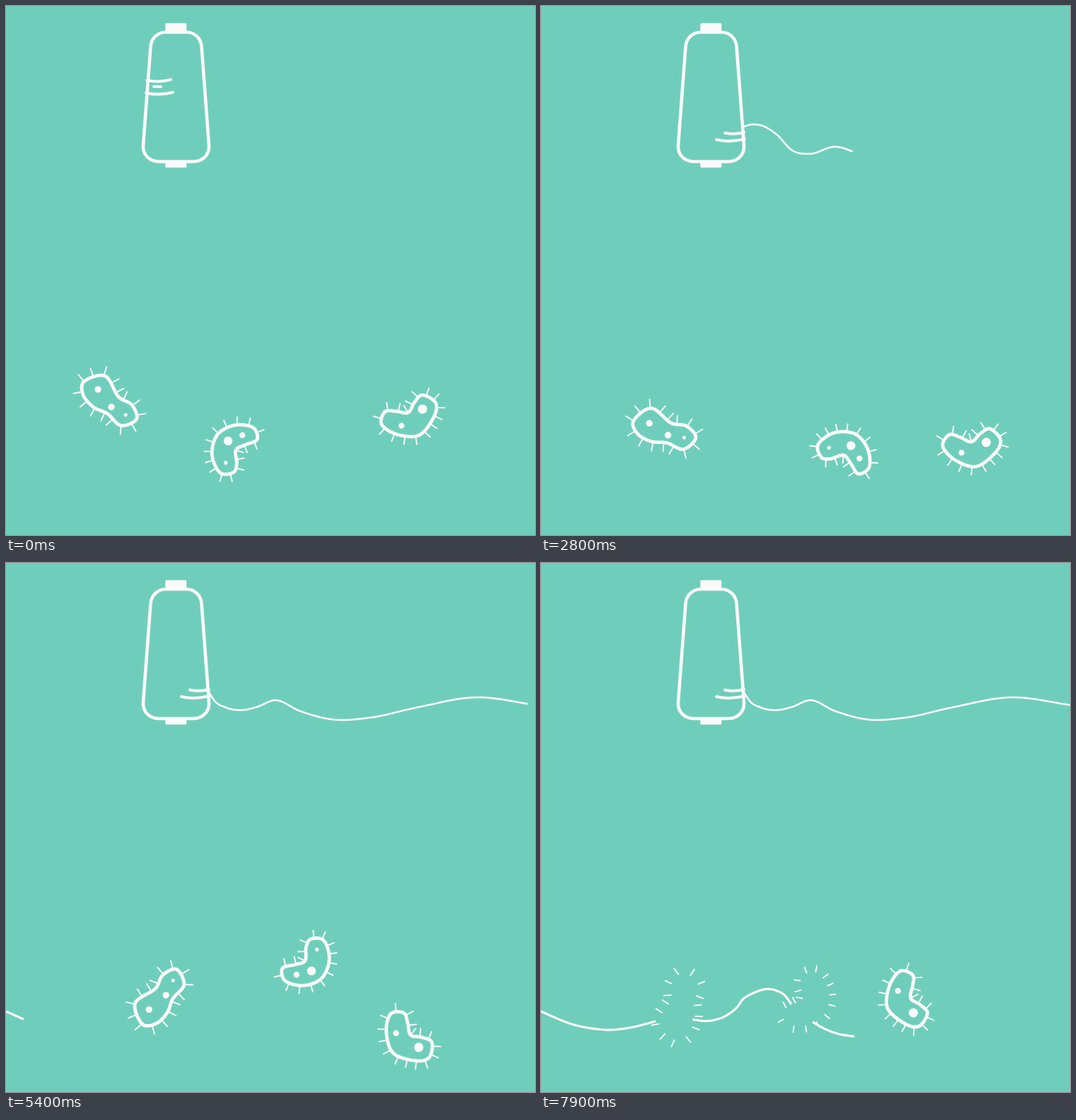
Recreate the animation shown at these times as an HTML page with a canvas. Size 748x748 px, loop 8 s.

```html
<!DOCTYPE html>
<html lang="en">
<head>
<meta charset="utf-8">
<title>Thread and microbes</title>
<style>
  html, body { margin: 0; width: 100%; height: 100%; overflow: hidden; background: #6fcebb; }
  canvas { display: block; }
</style>
</head>
<body>
<canvas id="stage" width="748" height="748"></canvas>
<script>
const ctx = document.getElementById('stage').getContext('2d');
const SIZE = 748, LOOP = 8000, STEP = 100;
const BACK = '#6fcebb', INK = '#fafafa';
const clamp = (v, a = 0, b = 1) => Math.min(b, Math.max(a, v));
const mix = (a, b, u) => a + (b - a) * u;
const smooth = u => u * u * (3 - 2 * u);
const column = (rows, i) => rows.map(row => row[i]);

// Smooth value through keys ks -> vs, constant outside of them.
function at(ks, vs, k) {
  const n = ks.length - 1;
  if (k <= ks[0]) return vs[0];
  if (k >= ks[n]) return vs[n];
  let i = 0;
  while (k >= ks[i + 1]) i++;
  const gap = j => ks[j + 1] - ks[j];
  const slope = j => (vs[j + 1] - vs[j]) / gap(j);
  const tangent = j => {
    if (j === 0) return slope(0);
    if (j === n) return slope(n - 1);
    return mix(slope(j - 1), slope(j), gap(j - 1) / (gap(j - 1) + gap(j)) ) ;
  };
  const d = gap(i), u = (k - ks[i]) / d, w = 1 - u;
  return mix(vs[i], vs[i + 1], smooth(u)) + d * u * w * (tangent(i) * w - tangent(i + 1) * u);
}

// Catmull-Rom curve sampled to a polyline.
function spline(p, closed) {
  const n = p.length, out = [];
  const get = i => closed ? p[(i + n) % n] : p[clamp(i, 0, n - 1)];
  for (let i = 0; i < (closed ? n : n - 1); i++) {
    const [a, b, c, d] = [get(i - 1), get(i), get(i + 1), get(i + 2)];
    for (let j = 0; j < 12; j++) {
      const u = j / 12;
      out.push([0, 1].map(k => b[k] + 0.5 * u * (c[k] - a[k]
        + u * (2 * a[k] - 5 * b[k] + 4 * c[k] - d[k]
        + u * (3 * (b[k] - c[k]) + d[k] - a[k])))));
    }
  }
  out.push(get(closed ? 0 : n - 1));
  return out;
}

const span = (a, b) => Math.hypot(b[0] - a[0], b[1] - a[1]);
const length = pts => pts.slice(1).reduce((sum, p, i) => sum + span(pts[i], p), 0);

// Strokes the first part (0..1 of the length) of a polyline.
function strokePart(pts, part, width) {
  if (part <= 0) return;
  const total = length(pts);
  ctx.beginPath();
  for (const p of pts) ctx.lineTo(...p);
  ctx.lineWidth = width;
  if (part < 1) ctx.setLineDash([total * part, total * 2]);
  ctx.stroke();
  ctx.setLineDash([]);
}

// Hairs stand upright on the outline; crowd pulls them towards its start.
function growHairs(body, { count, reach, crowd }) {
  const total = length(body), hairs = [];
  for (let i = 0; i < count; i++) {
    const f = i / count;
    let left = total * (f - crowd * (1 - Math.cos(f * 2 * Math.PI))), j = 0;
    while (left > span(body[j], body[j + 1])) left -= span(body[j], body[++j]);
    const [a, b] = [body[j], body[j + 1]], d = span(a, b);
    const nx = (b[1] - a[1]) / d, ny = (a[0] - b[0]) / d;
    const x = mix(a[0], b[0], left / d), y = mix(a[1], b[1], left / d);
    hairs.push([x + nx * 2, y + ny * 2, x + nx * reach, y + ny * reach]);
  }
  return hairs;
}

// Each pose is [time, x, y, degrees] of the origin.
const microbes = [
  {
    origin: [120.5, 589.5], count: 15, reach: 13.5, crowd: 0, hit: 6070,
    shape: [[77, 579], [101, 559.5], [130, 578.5], [152, 581.5], [166.5, 597],
      [150, 614.5], [126, 607], [104, 606.5], [84, 597]],
    dots: [[99.5, 581, 4.7], [127, 596, 4.7], [150, 598, 2.5]],
    poses: [[0, 145.7, 558.4, 24], [1200, 120.5, 589.5, 0], [2100, 151, 606, 3],
      [3500, 196.4, 591.4, -3], [4500, 232, 599.5, -36], [6070, 197, 628, -94]]
  },
  {
    origin: [411, 628], count: 16, reach: 11.8, crowd: 0.024, hit: 7250,
    shape: [[407, 644.5], [392, 657], [379, 660], [368, 645], [382, 621],
      [409, 610.5], [434, 622], [447, 645], [437, 660], [421, 651]],
    dots: [[384, 643.5, 2.7], [411, 628, 6.3], [429.5, 639.5, 4.2]],
    poses: [[0, 314, 615, -54], [1200, 366.5, 636.5, -30], [2100, 411, 628, 0], [3500, 454.5, 613, 51],
      [4500, 451, 592, 96], [6300, 407, 582, 150], [7250, 384.5, 628, 120]]
  },
  {
    origin: [636.5, 646], count: 16, reach: 12.4, crowd: 0.022, hit: Infinity,
    shape: [[616, 641.5], [630, 632.5], [645, 628], [657, 646], [646, 663],
      [616, 677], [588, 662], [575, 640], [587, 626], [601, 632]],
    dots: [[636.5, 646, 6.6], [599.5, 654, 4.1]],
    poses: [[0, 589, 570, -26], [1200, 623.5, 559, -46], [2100, 621, 590, -22.5], [3500, 636.5, 646, 0],
      [4500, 625, 689.5, 17], [6300, 541, 663, 68], [7900, 526.5, 636, 67]]
  }
];
for (const m of microbes) {
  m.body = spline(m.shape, true);
  m.hairs = growHairs(m.body, m);
}

function drawMicrobe(m, t) {
  const [x, y, turn] = [1, 2, 3].map(i => at(column(m.poses, 0), column(m.poses, i), t));
  const rest = 1 - clamp((t - m.hit) / 230);
  ctx.save();
  ctx.translate(x, y);
  ctx.rotate(turn * Math.PI / 180);
  ctx.translate(-m.origin[0], -m.origin[1]);
  ctx.lineWidth = 1.9;
  ctx.beginPath();
  for (const [x0, y0, x1, y1] of m.hairs) { ctx.moveTo(x0, y0); ctx.lineTo(x1, y1); }
  ctx.stroke();
  strokePart(m.body, rest, 4.8);
  for (const [dx, dy, r] of m.dots) {
    ctx.beginPath();
    ctx.arc(dx, dy, r * rest, 0, 7);
    ctx.fill();
  }
  ctx.restore();
}

// Upper thread: [x, height while loose, height when settled].
const knots = [[287, 170.5, 183], [295, 168, 195], [310, 168.5, 204], [333, 181.5, 208],
  [355, 204, 203.5], [380, 209, 194], [415, 199, 209], [460, 214, 221],
  [516, 230, 218.5], [580, 217, 204.5], [665, 190, 190], [750, 196, 201]];

function drawThread(t) {
  const s = (t - 1150) / 1000;
  if (s <= 0) return;
  const end = Math.min(750, 286 + 85.5 * s + 4.9 * s * s);
  const settled = smooth(clamp((t - 3400) / 2000));
  const xs = column(knots, 0), ys = knots.map(k => mix(k[1], k[2], settled));
  ctx.beginPath();
  for (let x = 287; x < end; x++) ctx.lineTo(x, at(xs, ys, x));
  ctx.lineTo(end, at(xs, ys, end));
  ctx.lineWidth = 2.6;
  ctx.stroke();
}

// Lower thread: stretches between the microbes.
const stretches = [
  { from: 5270, to: 6070, pts: spline([[0, 634], [45, 652.5], [90, 660], [126, 657], [162, 648]]) },
  { from: 6330, to: 7250, pts: spline([[214, 645.5], [236, 647.5], [258, 642], [276, 629.5],
    [289, 614], [318, 602.5], [341, 608.5], [354, 624]]) },
  { from: 7570, to: 7900, pts: spline([[384, 649], [402, 659], [421, 666], [443, 669.5]]) }
];

// Glints that sweep over the turning spool: marks are [start, end, y].
const TURN = 1200, SPEED = 0.4, LAST = 2100, REST = 71;
const glints = [
  { time: 900, marks: [[225, 255, 82], [235, 245, 94]] },
  { time: 0, marks: [[179, 233, 105], [209, 219, 114], [179, 236, 123]] },
  { time: 900, stays: true, marks: [[189, 216, 177.5], [177, 234, 187]] }
];

function drawGlints(t) {
  ctx.lineCap = 'round';
  ctx.lineWidth = 4;
  for (const { time, stays, marks } of glints) {
    if (!stays && t >= 2 * TURN) continue;
    const lap = (t - time + 1.5 * TURN) % TURN - TURN / 2;
    const shift = stays && t >= LAST ? Math.min(REST, SPEED * (t - LAST)) : SPEED * lap;
    for (const [a, b, y0] of marks) {
      const y = y0 + (stays ? 2 * clamp(shift / REST) : 0);
      const lean = (y - 57) * 0.075;
      const x0 = Math.max(a + shift, 203 - lean), x1 = Math.min(b + shift, 278 + lean);
      if (x1 - x0 < 3) continue;
      const bend = x1 - x0 > 12 ? (x1 - x0) * 0.11 : 0;
      ctx.beginPath();
      ctx.moveTo(x0, y);
      ctx.quadraticCurveTo((x0 + x1) / 2, y + bend, x1, y - bend / 4);
      ctx.stroke();
    }
  }
  ctx.lineCap = 'butt';
}

const spool = new Path2D('M226 37H255C267 37 275.5 46 276.5 57L287 197C288 210 278 220 265 220H216C203 220 193 210 194 197L204.5 57C205.5 46 214 37 226 37Z');

function drawSpool() {
  ctx.lineWidth = 4.6;
  ctx.stroke(spool);
  ctx.beginPath();
  ctx.roundRect(225.3, 24.3, 30, 13, 1.5);
  ctx.roundRect(225.3, 219, 30, 9.5, 1.5);
  ctx.fill();
}

function draw(t) {
  ctx.fillStyle = BACK;
  ctx.fillRect(0, 0, SIZE, SIZE);
  ctx.fillStyle = ctx.strokeStyle = INK;
  ctx.lineJoin = 'round';
  drawThread(t);
  drawGlints(t);
  drawSpool();
  for (const s of stretches) strokePart(s.pts, clamp((t - s.from) / (s.to - s.from)), 3.2);
  for (const m of microbes) drawMicrobe(m, t);
}

const begin = performance.now();
function tick() {
  const t = (performance.now() - begin) % LOOP;
  draw(Math.floor(t / STEP) * STEP);
  requestAnimationFrame(tick);
}
tick();
</script>
</body>
</html>
```
